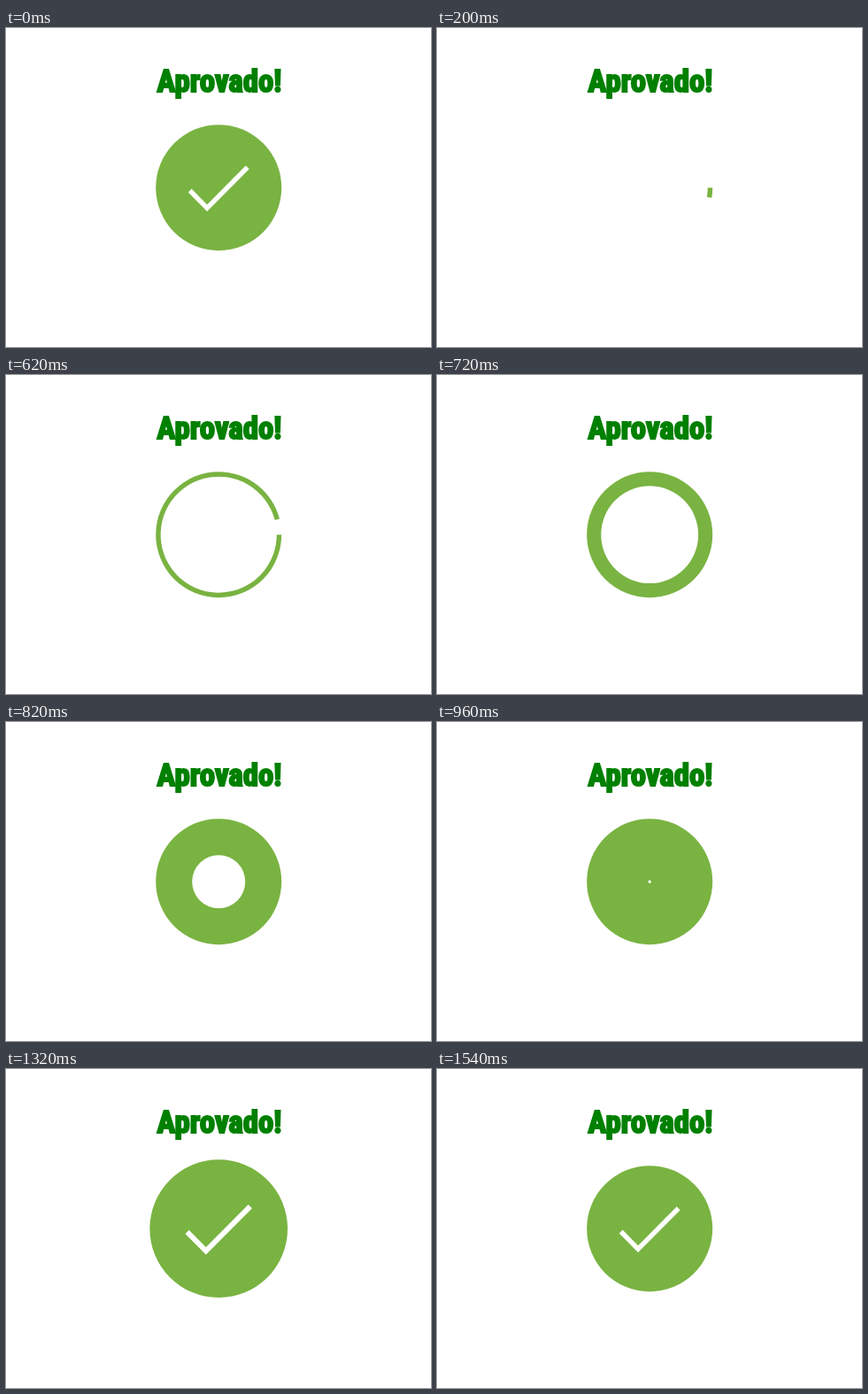
Animation, 480 px wide and 360 px high, one loop 1880 ms. Source, as an HTML page with a canvas:

```html
<!DOCTYPE html>
<html lang="pt">
<head>
<meta charset="utf-8">
<title>Aprovado!</title>
<style>
  html, body { margin: 0; width: 100%; height: 100%; overflow: hidden; background: #fff; }
  canvas { display: block; }
</style>
</head>
<body>
<canvas id="stage" width="480" height="360"></canvas>
<script>
const ctx = document.getElementById('stage').getContext('2d');

const LOOP = 1880, STEP = 20, LAST_STEP = 77;
const START_STEP = 4.25, STEP_TIME = 1000 / 60;
const CENTER = { x: 240.2, y: 180.2 };
const UNIT = 142 / 52;           // the icon is laid out in a 52 unit box
const GREEN = '#79b341';
const TITLE = { text: 'Aprovado!', x: 241, baseline: 72.2, width: 141, outline: 2 };

const clamp = v => Math.min(1, Math.max(0, v));

// CSS style cubic-bezier easing, solved by bisection
function bezier(x1, y1, x2, y2) {
  const curve = (a, b, s) => 3 * (1 - s) ** 2 * s * a + 3 * (1 - s) * s * s * b + s ** 3;
  return x => {
    if (x <= 0 || x >= 1) return clamp(x);
    let low = 0, high = 1;
    for (let i = 0; i < 30; i++) {
      const mid = (low + high) / 2;
      if (curve(x1, x2, mid) < x) low = mid; else high = mid;
    }
    return curve(y1, y2, low);
  };
}

const strokeEase = bezier(0.65, 0, 0.45, 1);
const easeInOut = bezier(0.42, 0, 0.58, 1);
const progress = (time, delay, duration) => clamp((time - delay) / duration);

function titleFont(size) {
  return `900 condensed ${size}px Impact, "Roboto Condensed", Roboto, sans-serif`;
}

// The outline gives the letters the weight of a poster face
function drawTitle() {
  ctx.font = titleFont(100);
  const size = Math.min(38, 100 * TITLE.width / ctx.measureText(TITLE.text).width);
  ctx.font = titleFont(size);
  ctx.textAlign = 'center';
  ctx.fillStyle = ctx.strokeStyle = '#008000';
  ctx.lineWidth = TITLE.outline;
  ctx.lineJoin = 'miter';
  ctx.miterLimit = 3;
  ctx.fillText(TITLE.text, TITLE.x, TITLE.baseline);
  ctx.strokeText(TITLE.text, TITLE.x, TITLE.baseline);
}

function drawRing(time) {
  const length = 169 * strokeEase(progress(time, 0, 600));
  const angle = Math.min(2 * Math.PI, length / 25);
  if (angle <= 0) return;
  const closed = angle >= 2 * Math.PI;
  const inset = 74 / UNIT * easeInOut(progress(time, 400, 400));
  const hole = closed ? Math.max(0, Math.min(24, 26 - inset)) : 24;
  ctx.fillStyle = GREEN;
  ctx.beginPath();
  ctx.arc(0, 0, 26, 0, angle);
  if (closed) {
    ctx.closePath();
    ctx.moveTo(hole, 0);
  }
  ctx.arc(0, 0, hole, angle, 0, true);
  ctx.fill();
}

function drawCheck(time) {
  const length = 48 * strokeEase(progress(time, 800, 300));
  if (length <= 0) return;
  ctx.strokeStyle = '#fff';
  ctx.lineWidth = 2;
  ctx.lineJoin = 'miter';
  ctx.setLineDash([length, 100]);
  ctx.beginPath();
  ctx.moveTo(-11.9, 1.2);
  ctx.lineTo(-4.8, 8.4);
  ctx.lineTo(11.9, -8.4);
  ctx.stroke();
  ctx.setLineDash([]);
}

function pulse(time) {
  const p = progress(time, 900, 300) * 2;
  return 1 + 0.1 * (p < 1 ? easeInOut(p) : 1 - easeInOut(p - 1));
}

function draw(now) {
  const step = Math.min(LAST_STEP, Math.floor((now % LOOP) / STEP));
  // each loop opens on the finished icon for one step
  const time = ((step || LAST_STEP) - START_STEP) * STEP_TIME;

  ctx.fillStyle = '#fff';
  ctx.fillRect(0, 0, 480, 360);
  drawTitle();

  ctx.save();
  ctx.translate(CENTER.x, CENTER.y);
  const scale = UNIT * pulse(time);
  ctx.scale(scale, scale);
  drawRing(time);
  drawCheck(time);
  ctx.restore();
}

const origin = performance.now();
function tick() {
  draw(performance.now() - origin);
  requestAnimationFrame(tick);
}
tick();
</script>
</body>
</html>
```
